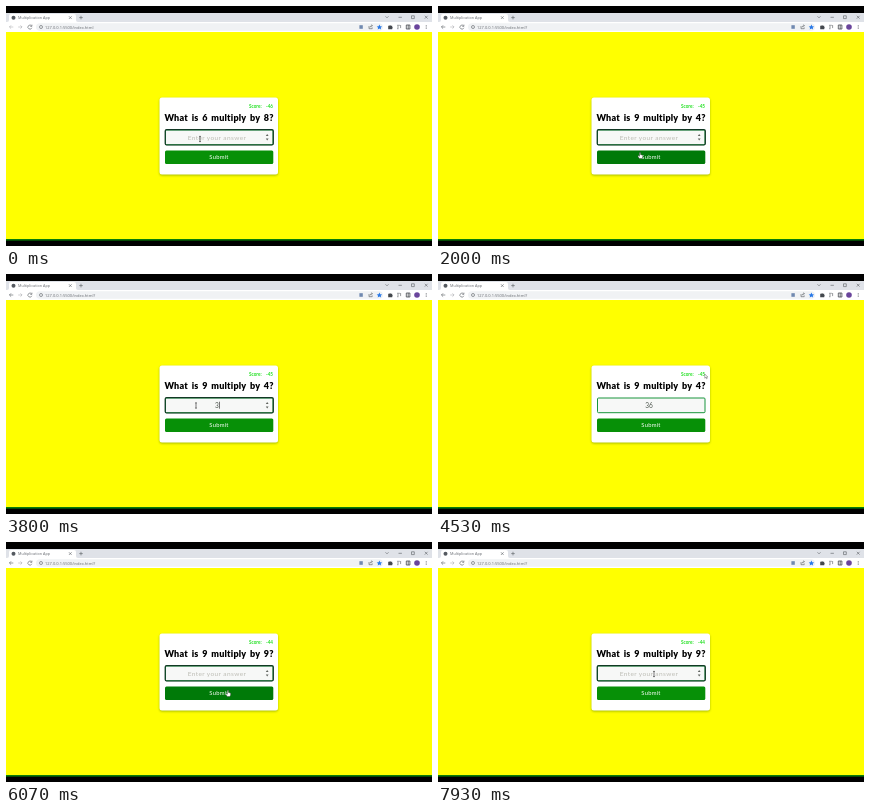
Animation, 426 px wide and 240 px high, one loop 8 s. Source, as an HTML page:

```html
<!DOCTYPE html>
<html lang="en">
<head>
<meta charset="utf-8">
<title>Multiplication App</title>
<style>
  html, body { margin: 0; width: 100%; height: 100%; overflow: hidden; background: #000; }
  svg { display: block; width: 100%; height: 100%; }
  text { font-family: Lato, "Open Sans", sans-serif; }
  .chrome { font: 4px "Open Sans", sans-serif; fill: #666a70; }
  .line { fill: none; stroke: #62666b; stroke-width: .65; }
  .mid { text-anchor: middle; }
  #question { font-size: 9px; font-weight: 900; letter-spacing: .22px; word-spacing: 1.4px; }
  #hint { font-size: 6.5px; letter-spacing: .4px; fill: #bcbcb4; }
  #answer { font-size: 6.6px; fill: #505850; }
  .score { font-size: 4.6px; font-weight: 700; fill: #20e020; }
  #submit { font-size: 5.8px; letter-spacing: .25px; fill: #fff; }
  #card { filter: drop-shadow(0 1px 1.3px rgba(0, 60, 0, .35)); }
</style>
</head>
<body>
<svg viewBox="0 0 426 240" preserveAspectRatio="none">
  <rect width="426" height="240"/>
  <rect y="7" width="426" height="9" fill="#dfe2e8"/>
  <path d="M1 16Q3 16 3 14V10Q3 8 5 8H68Q70 8 70 10V14Q70 16 72 16Z" fill="#fff"/>
  <rect y="16" width="426" height="10" fill="#fff"/>
  <rect y="26" width="426" height="207.5" fill="#ff0"/>
  <rect y="233" width="426" height="1.6" fill="#087c08"/>

  <circle cx="7.5" cy="11.7" r="2" fill="#555a60"/>
  <text class="chrome" x="12" y="13.1" style="font-size:3.8px">Multiplication App</text>
  <path class="line" d="M63 10.3l2.6 2.6m0-2.6l-2.6 2.6M73.2 11.6h3.6m-1.8-1.8v3.6
    M379.5 10.3l1.5 1.5 1.5-1.5M392.5 11.3h3.4M405.5 9.8h2.8v2.8h-2.8zM418.8 9.8l2.8 2.8m0-2.8l-2.8 2.8"/>

  <path id="back" class="line" d="M7.3 21H3.5m1.6-1.7L3.4 21l1.7 1.7"/>
  <path class="line" opacity=".45" d="M12.2 21h3.8m-1.6-1.7L16.1 21l-1.7 1.7"/>
  <path class="line" d="M25.6 20a2 2 0 1 0 .2 1.8M25.9 18.6v1.7h-1.7"/>
  <rect x="30" y="17.2" width="347" height="7.6" rx="3.8" fill="#f0f2f4"/>
  <circle class="line" cx="35" cy="21" r="1.5"/>
  <text class="chrome" id="url" x="39" y="22.5"></text>
  <rect x="353.4" y="19.2" width="3.4" height="3.6" fill="#7089b0"/>
  <path class="line" d="M363 20v2.7h3.2v-1.3m-2.2 0q.2-1.8 2.4-1.8m-1-.9l1 .9-1 .9"/>
  <path d="M373.4 18.4l.8 1.8 1.9.2-1.4 1.3.4 1.9-1.7-1-1.7 1 .4-1.9-1.4-1.3 1.9-.2z" fill="#2878e8"/>
  <path d="M382.2 19.7h1a1 1 0 0 1 1.8 0h1.2v1.3a.9.9 0 0 1 0 1.6v.7h-4z" fill="#44484e"/>
  <path class="line" d="M391 19.3h2.8m-2.8 1.7h2m-2 1.7h1.6m2-3.7v3.1"/>
  <path d="M400.3 19h3.6v4h-3.6zm1.9 0v4" fill="none" stroke="#44484e" stroke-width=".8"/>
  <circle cx="411" cy="21" r="2.8" fill="#6a459c"/>
  <path d="M419.8 19h.8v.8h-.8zm0 1.6h.8v.8h-.8zm0 1.6h.8v.8h-.8z" fill="#55595e"/>

  <rect id="card" x="153.5" y="91.5" width="118.5" height="77" rx="2.5" fill="#fff"/>
  <rect id="selection" x="261" y="96.5" width="6" height="6.5" fill="#28a0e8"/>
  <text class="score" x="243" y="101.7">Score:</text>
  <text class="score" id="score" x="267" y="101.7" text-anchor="end"></text>
  <text class="mid" id="question" x="213" y="115.2"></text>
  <rect x="159.5" y="124" width="107.5" height="14.7" rx="1" fill="#f7f8f7" stroke="#18953c"/>
  <g id="focus">
    <rect x="159.2" y="123.7" width="108.1" height="15.3" rx="1.4" fill="none" stroke="#123824" stroke-width="1.2"/>
    <path d="M259.8 130l1.4-1.9 1.4 1.9zm0 2.5h2.8l-1.4 1.9z" fill="#60645f"/>
  </g>
  <text class="mid" id="hint" x="211" y="133.5">Enter your answer</text>
  <text class="mid" id="answer" x="211" y="133.6"></text>
  <rect id="caret" y="127.7" width=".6" height="7" fill="#222"/>
  <rect id="button" x="159" y="144.4" width="108.3" height="13.7" rx="1.5"/>
  <text class="mid" id="submit" x="213" y="153.4">Submit</text>

  <g id="pointer">
    <path id="beam" d="M-1-2.6h2M0-2.6v5.2M-1 2.6h2" fill="none" stroke="#444" stroke-width=".7"/>
    <path id="hand" d="M-.5-2.6h1v2.2l2.2.6v2L2 3.6H-.8L-2.2 1l.6-.5 1.1.8z" fill="#fff" stroke="#222" stroke-width=".35"/>
    <path id="arrow" d="M0 0v4.2l1-.9.7 1.5.7-.3-.7-1.5h1.4z" fill="#fff" stroke="#222" stroke-width=".35"/>
  </g>
</svg>
<script>
  const LOOP = 8000;
  const $ = id => document.getElementById(id);
  const show = (id, on) => { $(id).style.visibility = on ? 'visible' : 'hidden'; };
  const write = (id, text) => { if ($(id).textContent !== text) $(id).textContent = text; };

  const rounds = [
    { at: 0, a: 6, b: 8, score: -46 },
    { at: 1500, a: 9, b: 4, score: -45 },
    { at: 5800, a: 9, b: 9, score: -44 }
  ];
  const typing = [
    { at: 0, text: '' }, { at: 400, text: '4' }, { at: 600, text: '48' },
    { at: 1500, text: '' }, { at: 3650, text: '3' }, { at: 3930, text: '36' },
    { at: 5800, text: '' }
  ];
  // time, x, y
  const path = [
    [0, 194, 133], [500, 194, 135.5], [850, 194, 135.5], [1350, 202, 149],
    [2250, 202, 149], [2850, 190, 131.5], [4050, 190, 131.5], [4500, 267, 100],
    [4750, 261, 100], [4900, 261, 100], [5200, 239, 142.5], [5550, 222, 151],
    [6050, 222, 151], [6500, 211, 131.5], [6950, 211, 131.5], [7700, 216, 132], [LOOP, 216, 132]
  ];

  const latest = (steps, t) => steps.filter(s => s.at <= t).pop();

  function pointAt(t) {
    const i = Math.max(1, path.findIndex(p => p[0] > t));
    const [t0, x0, y0] = path[i - 1], [t1, x1, y1] = path[i];
    const u = (t - t0) / (t1 - t0), e = u * u * (3 - 2 * u);
    return [x0 + (x1 - x0) * e, y0 + (y1 - y0) * e];
  }

  function draw(t) {
    const round = latest(rounds, t), entry = latest(typing, t);
    const [x, y] = pointAt(t);
    const inside = x > 159 && x < 267;
    const overInput = inside && y > 124 && y < 139;
    const overButton = inside && y > 144 && y < 158;
    const focused = t < 4500 || t >= 5800;

    write('question', `What is ${round.a} multiply by ${round.b}?`);
    write('score', String(round.score));
    write('answer', entry.text);
    write('url', '127.0.0.1:5500/index.html' + (round.at ? '?' : ''));
    $('back').style.opacity = round.at ? 1 : .45;
    show('hint', !entry.text);
    show('focus', focused);
    $('caret').setAttribute('x', 211.2 + entry.text.length * 1.95);
    show('caret', focused && entry.text && (t - entry.at) % 1000 < 500);

    const selected = t >= 4700 && t < 5800;
    show('selection', selected);
    $('score').style.fill = selected ? '#fff' : '';
    $('button').style.fill = overButton ? '#007a08' : '#079007';

    $('pointer').setAttribute('transform', `translate(${x} ${y})`);
    show('beam', overInput);
    show('hand', overButton);
    show('arrow', !overInput && !overButton);
  }

  function tick() {
    draw(performance.now() % LOOP);
    requestAnimationFrame(tick);
  }
  tick();
</script>
</body>
</html>
```
